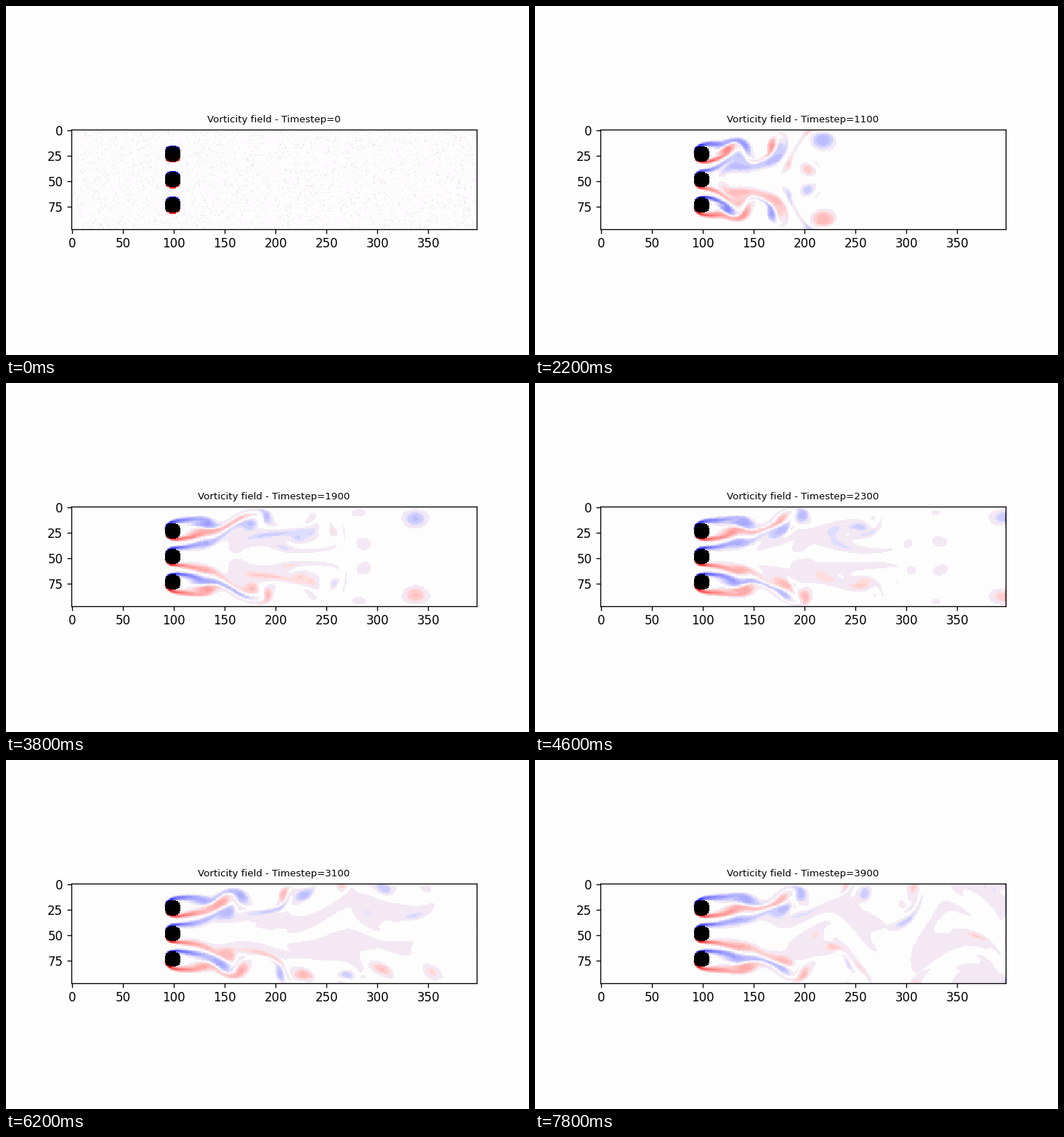
A matplotlib script for the animation above (8000 ms loop, 720x480 px).

```python
import numpy as np
import matplotlib.pyplot as plt
from matplotlib.animation import FuncAnimation
from matplotlib.colors import ListedColormap

# Lattice Boltzmann (D2Q9) flow past three cylinders
NX, NY = 400, 100
TAU = 0.53
FRAMES, STRIDE = 40, 100
CX = [0, 0, 1, 1, 1, 0, -1, -1, -1]
CY = [0, 1, 1, 0, -1, -1, -1, 0, 1]
OPPOSITE = [0, 5, 6, 7, 8, 1, 2, 3, 4]
WEIGHT = [4 / 9] + [1 / 9, 1 / 36] * 4
PAPER = "#fefefe"


def cylinders(radius=8):
    y, x = np.mgrid[:NY, :NX]
    solid = np.zeros((NY, NX), bool)
    for k in (1, 2, 3):
        solid |= np.hypot(x - NX // 4, y - k * NY // 4) < radius
    return solid


def stream(f):
    f[6:9, :, -1] = f[6:9, :, -2]
    f[2:5, :, 0] = f[2:5, :, 1]
    for i in range(1, 9):
        f[i] = np.roll(f[i], (CY[i], CX[i]), (0, 1))


def moments(f):
    rho = f.sum(axis=0)
    east = f[2] + f[4]
    west = f[6] + f[8]
    ux = (east + f[3] - west - f[7]) / rho
    uy = (f[1] + f[2] + f[8] - f[4] - f[5] - f[6]) / rho
    return rho, ux, uy


def collide(f, rho, ux, uy):
    f *= 1 - 1 / TAU
    scaled = rho / TAU
    base = 1 - 1.5 * (ux * ux + uy * uy)
    f[0] += WEIGHT[0] * scaled * base
    for i, cu in ((1, uy), (2, ux + uy), (3, ux), (4, ux - uy)):
        w = WEIGHT[i] * scaled
        even = (base + 4.5 * cu * cu) * w
        odd = 3 * cu * w
        f[i] += even + odd
        f[OPPOSITE[i]] += even - odd


def vorticity(ux, uy, solid):
    curl = (ux[2:, 1:-1] - ux[:-2, 1:-1]) - (uy[1:-1, 2:] - uy[1:-1, :-2])
    return np.ma.array(curl, mask=solid[1:-1, 1:-1])


def simulate():
    rng = np.random.RandomState(42)
    noise = 0.01 * rng.randn(NY, NX, 9)
    f = np.ascontiguousarray((1 + noise).transpose(2, 0, 1), dtype=np.float32)
    f[3] = 2.3
    solid = cylinders()
    rows, cols = np.nonzero(solid)
    fields = []
    for step in range((FRAMES - 1) * STRIDE + 1):
        stream(f)
        rho, ux, uy = moments(f)
        f[:, rows, cols] = f[:, rows, cols][OPPOSITE]
        ux[rows, cols] = 0
        uy[rows, cols] = 0
        if step % STRIDE == 0:
            fields.append(vorticity(ux, uy, solid))
        collide(f, rho, ux, uy)
    return fields


def shade(s):
    """Banded blue-white-red with a pale lavender rim around zero."""
    a = abs(s)
    if a < 0.06:
        return (0.995, 0.995, 0.995)
    if a < 0.13:
        return (0.953, 0.910, 0.953)
    pale = 1 - min(1, round(a / 0.065) * 0.065)
    return (pale, pale, 1) if s < 0 else (1, pale, pale)


fields = simulate()
cmap = ListedColormap([shade(s) for s in np.linspace(-1, 1, 255)])
cmap.set_bad("black")

fig = plt.figure(figsize=(6, 4), dpi=120, facecolor=PAPER)
ax = fig.add_axes([0.125, 0.125, 0.775, 0.755], facecolor=PAPER)
img = ax.imshow(fields[0], cmap=cmap, interpolation="nearest")
ax.set_xticks(range(0, 351, 50))
ax.set_yticks(range(0, 76, 25))
ax.tick_params(axis="x", pad=2.9)
title = ax.set_title("", fontsize=8)


def update(k):
    peak = float(np.abs(fields[k]).max())
    img.set_data(fields[k])
    img.set_clim(-peak, peak)
    title.set_text(f"Vorticity field - Timestep={k * STRIDE}")
    return img, title


anim = FuncAnimation(fig, update, frames=FRAMES, interval=200,
                     repeat=True, repeat_delay=0, blit=False)
plt.show()
```
